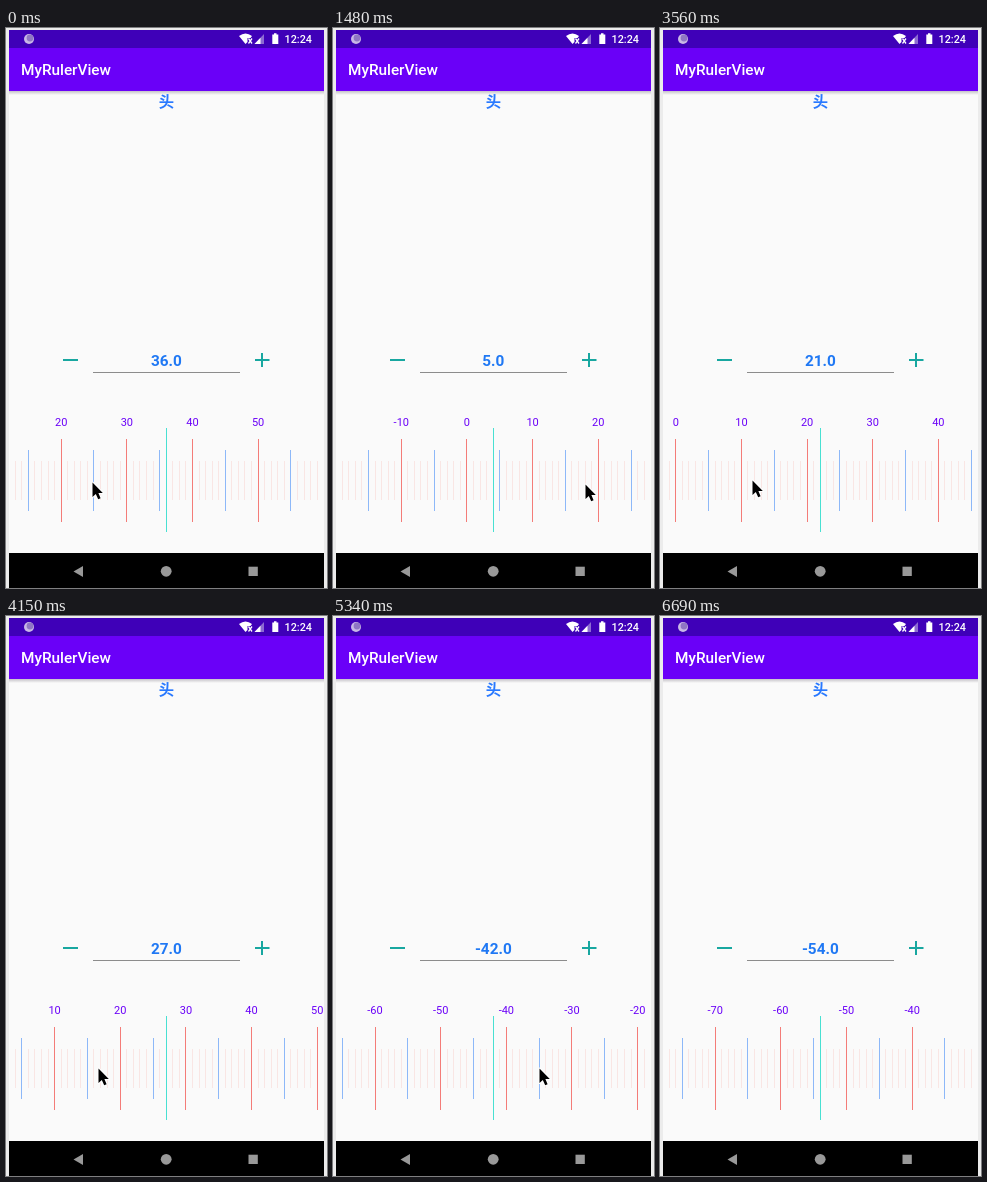
An HTML page with a canvas for the animation above (6.98 s loop, 321 by 560 pixels).

```html
<!DOCTYPE html>
<html lang="en">
<head>
<meta charset="utf-8">
<title>MyRulerView</title>
<style>
html, body { margin: 0; height: 100%; overflow: hidden; background: #ececec; }
canvas { display: block; width: 321px; height: 560px; }
</style>
</head>
<body>
<canvas></canvas>
<script>
const LOOP = 6980, STEPS = 47, CENTER = 160.2, UNIT = 6.565, REACH = 23;
const TEAL = '#18a7a0', PURPLE = '#6a00f8', WHITE = '#fff', GRAY = '#999';
const canvas = document.querySelector('canvas');
const ctx = canvas.getContext('2d');
const ratio = window.devicePixelRatio || 1;
canvas.width = 321 * ratio;
canvas.height = 560 * ratio;
ctx.scale(ratio, ratio);

const easeOut = t => 1 - (1 - t) ** 2;
const easeInOut = t => t < 0.5 ? 2 * t * t : 1 - 2 * (1 - t) ** 2;

// Plays eased moves one after another, each from wherever the last one ended
function track(origin, ...moves) {
  return step => moves.reduce((position, [start, end, target, ease = easeInOut]) => {
    const t = Math.min(Math.max((step - start) / (end - start), 0), 1);
    return position + (target - position) * ease(t);
  }, origin);
}
const rulerAt = track(36, [0, 12, 3, easeOut], [18.3, 26.8, 27], [30, 35, -42], [36, 38, -55], [38, 39, -54]);
const pointerX = track(86, [0, 10, 252, easeOut], [15, 17, 271], [18, 23.1, 92, easeOut],
  [30, 33.15, 286], [33.15, 36, 206], [36, 38, 293], [38, 40, 278], [42, 44, 244]);
const pointerY = track(454, [0, 10, 456], [15, 17, 452], [37, 40, 468], [42, 44, 537]);
const valueAt = step => Math.round(rulerAt(step));

function rect(x, y, w, h, color) {
  ctx.fillStyle = color;
  ctx.fillRect(x, y, w, h);
}
function text(string, x, y, font, color, align = 'center') {
  ctx.font = font;
  ctx.fillStyle = color;
  ctx.textAlign = align;
  ctx.fillText(string, x, y);
}
function shape(path, color, outline) {
  const p = new Path2D(path);
  if (outline) {
    ctx.strokeStyle = outline;
    ctx.lineWidth = 2;
    ctx.stroke(p);
  }
  ctx.fillStyle = color;
  ctx.fill(p);
}
function disc(x, y, r, color) {
  ctx.fillStyle = color;
  ctx.beginPath();
  ctx.arc(x, y, r, 0, 7);
  ctx.fill();
}

function drawStatusBar() {
  rect(3, 2, 315, 18, '#3f00b8');
  disc(23, 11, 5, '#c9b8e6');
  disc(24, 10, 3.4, '#8f76c4');
  shape('M233 8Q239.500 3 246 8L244.500 10H241.500V14L239.500 16Z', WHITE);
  shape('M242 11L243 10L246.500 15L245.500 16ZM245.500 10L246.500 11L243 16L242 15Z', WHITE);
  shape('M258 6V16H248.500Z', '#8c6ad2');
  shape('M254.500 9.700V16H248.500Z', WHITE);
  shape('M266.300 6.500H268V5.300H270.500V6.500H272.300V16H266.300Z', WHITE);
  text('12:24', 278.5, 15, '500 10.8px Roboto, sans-serif', WHITE, 'left');
}

function drawScreen() {
  rect(0, 0, 321, 560, '#ececec');
  rect(3, 63, 315, 462, '#fafafa');
  const shadow = ctx.createLinearGradient(0, 63, 0, 67);
  shadow.addColorStop(0, '#c4c2c8');
  shadow.addColorStop(1, '#fafafa');
  rect(3, 63, 315, 4, shadow);
  drawStatusBar();
  rect(3, 20, 315, 43, PURPLE);
  text('MyRulerView', 15, 47, '500 15.33px Roboto, sans-serif', WHITE, 'left');

  text('头', 160.5, 78.5, 'bold 15.33px "Noto Sans CJK SC", "Noto Sans CJK", sans-serif', '#2979ff');
  rect(57, 331, 15, 2, TEAL);
  rect(249, 331, 14.5, 2, TEAL);
  rect(255, 325, 2, 14, TEAL);
  rect(87, 344, 147, 1, '#8c8c8c');

  rect(3, 525, 315, 35, '#000');
  shape('M77 538V549L67.500 543.500Z', GRAY);
  disc(160.2, 543.3, 5.4, GRAY);
  rect(242.5, 538.7, 9.3, 9.3, GRAY);
}

function drawRuler(value) {
  for (let d = -REACH; d <= REACH; d++) {
    const mark = value + d, x = CENTER + d * UNIT, left = Math.floor(x);
    if (mark % 10 === 0) {
      rect(left, 411, 1, 83, '#f47c78');
      text(String(mark), x, 398, '11px Roboto, sans-serif', PURPLE);
    } else if (mark % 5 === 0) {
      rect(left, 422, 1, 61, '#8db8f8');
    } else {
      rect(left, 433, 1, 39, '#f9e6e4');
    }
  }
  rect(160, 400, 1, 104, '#48e0d2');
}

function drawPointer(x, y) {
  ctx.save();
  ctx.translate(x, y);
  ctx.lineJoin = 'round';
  shape('M.500 .500V15L3.800 12L6.200 17.200L8.600 16.200L6.400 11H10.800Z', '#000', WHITE);
  ctx.restore();
}

function draw(now) {
  // The small lead absorbs the 10 ms rounding of step times
  const step = Math.floor((now % LOOP) / LOOP * STEPS + 0.06);
  const value = valueAt(step), change = value - valueAt(step - 1);
  // The readout trails the ruler while it moves
  const shown = value - Math.sign(change) * Math.ceil(Math.abs(change) / 6);
  drawScreen();
  text(shown.toFixed(1), 160.3, 337.5, 'bold 15.33px Roboto, sans-serif', '#1f78f4');
  drawRuler(value);
  if (step < 45) drawPointer(pointerX(step), pointerY(step));
}

const start = performance.now();
function tick() {
  draw(performance.now() - start);
  requestAnimationFrame(tick);
}
tick();
</script>
</body>
</html>
```
